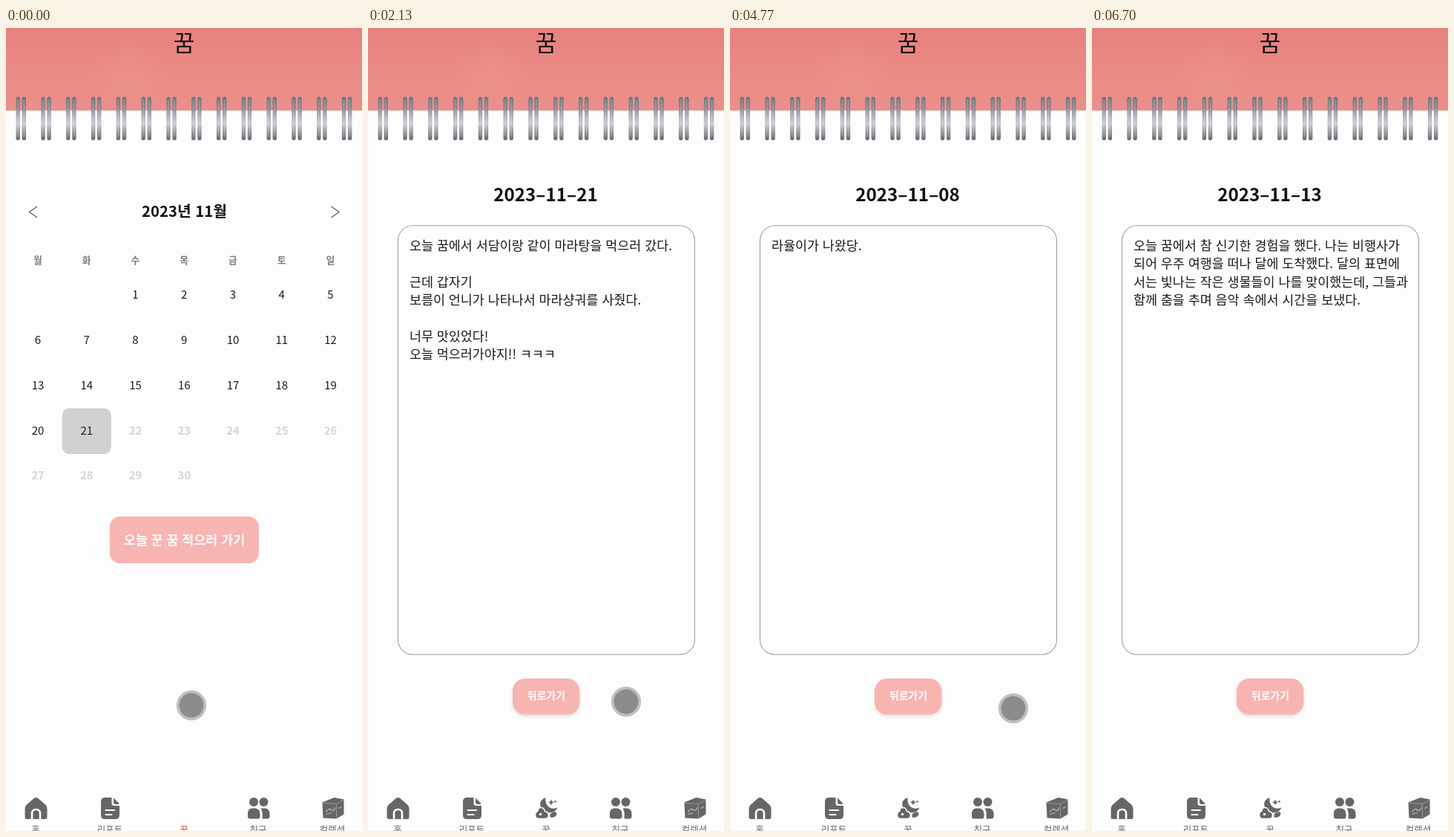
Recreate the animation shown at these times as an HTML page. Size 480x1080 px, loop 7460 ms.

```html
<!DOCTYPE html>
<html lang="ko">
<head>
<meta charset="utf-8">
<style>
html, body { margin: 0; width: 100%; height: 100%; overflow: hidden; background: #fdfdfd; }
svg { display: block; width: 480px; height: 1080px; }
text { font-family: 'Noto Sans CJK KR', 'Noto Sans CJK JP', 'Noto Sans CJK', sans-serif; }
.mid { text-anchor: middle; }
</style>
</head>
<body>
<svg id="stage" viewBox="0 0 480 1080" xmlns="http://www.w3.org/2000/svg">
  <defs>
    <linearGradient id="head" x1="0" y1="0" x2="0" y2="1">
      <stop offset="0" stop-color="#e8827e"/><stop offset="1" stop-color="#eb908b"/>
    </linearGradient>
    <radialGradient id="glow">
      <stop offset="0" stop-color="#f2a49e" stop-opacity=".25"/><stop offset="1" stop-color="#f2a49e" stop-opacity="0"/>
    </radialGradient>
    <linearGradient id="wire" x1="0" y1="0" x2="0" y2="1">
      <stop offset="0" stop-color="#77727a"/><stop offset=".28" stop-color="#8b8890"/>
      <stop offset=".42" stop-color="#a9abb6"/><stop offset=".62" stop-color="#c6c9d3"/>
      <stop offset=".8" stop-color="#96979e"/><stop offset="1" stop-color="#66666a"/>
    </linearGradient>
    <filter id="soft" x="-20%" y="-20%" width="140%" height="150%">
      <feDropShadow dx="0" dy="2" stdDeviation="2" flood-color="#000" flood-opacity=".14"/>
    </filter>
    <filter id="blur"><feGaussianBlur stdDeviation=".7"/></filter>

    <g id="pig">
      <circle cx="-11.5" cy="-10.500" r="4.600" fill="#fbe0c6"/><circle cx="11.5" cy="-10.500" r="4.600" fill="#fbe0c6"/>
      <path d="M-13-8Q-12-13 0-13T13-8L15 3Q14 14.500 0 14.500T-15 3Z" fill="#fdead4"/>
      <rect x="-11" y="-5" width="22" height="11" rx="5.500" fill="#fbcdc5"/>
      <rect x="-7.500" y="-3.500" width="15" height="7.500" rx="3.700" fill="#f5b3b0"/>
      <path d="M-3.500-1v2M3.500-1v2" stroke="#dc8a8a" stroke-width="1.600" stroke-linecap="round"/>
      <circle cx="-9" cy="-5" r=".9" fill="#c99a8c"/><circle cx="9" cy="-5" r=".9" fill="#c99a8c"/>
    </g>
    <g id="meal" stroke-linecap="round" fill="none">
      <path d="M5-5L-12.500 13.500" stroke="#fbdc97" stroke-width="3.600"/>
      <path d="M9-14.500L4-9Q2-5 5-3T11-4L15.500-9M12.500-12L7-6" stroke="#fbdb90" stroke-width="3"/>
      <path d="M-6-6L12.500 13.500" stroke="#eb918a" stroke-width="3.400"/>
      <ellipse cx="-9.500" cy="-9.500" rx="5" ry="6.800" transform="rotate(-45 -9.500 -9.500)" fill="#ee938c"/>
    </g>
    <g id="coin">
      <circle r="16.500" fill="#fdc52f"/><circle r="13" fill="#f9ae0b"/>
      <text class="mid" y="8" font-size="22" font-weight="500" fill="#fff0b4">$</text>
    </g>
    <g id="imp">
      <path d="M-9-8Q-15-11-12-16Q-10-12-4-11ZM9-8Q15-11 12-16Q10-12 4-11Z" fill="#66545a"/>
      <path d="M-10-10Q0-15 10-10Q17-8 16-1Q15 5 10 5Q9 8 5 7Q0 10-5 7Q-9 8-10 4Q-16 4-16-2Q-16-8-10-10Z" fill="#f0a0a2"/>
      <circle cx="-5" cy="-5" r="2.600" fill="#fbe9e9"/><circle cx="5" cy="-5" r="2.600" fill="#fbe9e9"/>
      <circle cx="-4.500" cy="-5" r="1.200" fill="#6b4449"/><circle cx="4.500" cy="-5" r="1.200" fill="#6b4449"/>
      <path d="M-4 2Q0-1 4 2" stroke="#d07880" stroke-width="1.500" fill="none"/>
      <circle cx="-5" cy="11" r="3" fill="#f3abab"/><circle cx="7" cy="12" r="3.500" fill="#ee9c9f"/><circle cx="1" cy="9" r="2" fill="#f3abab"/>
    </g>
    <g id="pals">
      <path d="M-1 14V4Q0 0 7 0Q15 0 15 7V13Q8 15-1 14Z" fill="#cf9bc4"/>
      <circle cx="7" cy="-4" r="8.500" fill="#eccb78"/><ellipse cx="6" cy="0" rx="6" ry="6" fill="#c4956f"/>
      <path d="M-16 14V8Q-15 2-8 2T1 8V14Z" fill="#8461b8"/>
      <circle cx="-8" cy="-5" r="9" fill="#60656d"/><ellipse cx="-7" cy="0" rx="6" ry="6" fill="#e8ba98"/>
      <path d="M-9 0h1M-5 0h1M4 0h1M8 0h1" stroke="#544" stroke-width="1.400"/>
    </g>
    <g id="pile">
      <path d="M-1-13Q5-12 4-8Q10-7 9-1Q16 1 16 7Q16 12 10 12H-10Q-16 12-16 7Q-16 1-10 0Q-10-6-4-7Q0-9-1-13Z" fill="#c08573"/>
      <path d="M-10 1Q0 3 9-1M-5-7Q0-5 4-8" stroke="#ab6e5c" fill="none"/>
      <path d="M-5 3v2M5 3v2" stroke="#5b3a32" stroke-width="1.600" stroke-linecap="round"/>
      <path d="M-3 6Q0 10 3 6" stroke="#f6e3dc" stroke-width="1.300" fill="none"/>
    </g>

    <g id="home">
      <path d="M0-14.500Q2-14.500 4-12.500L13-4.500Q15-2.500 15 .5V12Q15 14.500 12 14.500H-12Q-15 14.500-15 12V.5Q-15-2.500-13-4.500L-4-12.500Q-2-14.500 0-14.500Z" fill="#666"/>
      <path d="M-5.500 15V7Q-5.500 1.500 0 1.500T5.500 7V15" stroke="#fdfdfd" stroke-width="2.600" fill="none"/>
    </g>
    <g id="report">
      <path d="M-7-14.500H2V-7Q2-3.500 5.500-3.500H12.500V9Q12.500 14.500 7 14.500H-7Q-12.500 14.500-12.500 9V-9Q-12.500-14.500-7-14.500ZM4.500-14L12-6.500Q12-5.500 11-5.500H7Q4.500-5.500 4.500-8Z" fill="#666"/>
      <path d="M-6 2.500H5.500M-6 8.500H2" stroke="#fdfdfd" stroke-width="2.200" stroke-linecap="round"/>
    </g>
    <g id="dream">
      <path d="M-1-14.500Q-10-11-8-3Q-5 6 4 6Q12 6 15-1Q8 2 3-2T-1-14.500Z"/>
      <path d="M6.500-12l1.200 2.800 2.800 1.200-2.800 1.200-1.200 2.800-1.200-2.800-2.800-1.200 2.800-1.200Z"/>
      <circle cx="12" cy="-9" r="1.300"/>
      <path d="M-7.500-1Q-3-1-2 4Q3 5 3 9.500Q3 14-2 14H-10Q-15 14-15 9Q-15 5-12 4Q-11-1-7.500-1Z" stroke="#fdfdfd" stroke-width="1.500"/>
      <path d="M5 8Q9 4 13 5Q15 8 12 11Q9 13 5 12Z"/>
      <circle cx="-8" cy="8" r="1.800" fill="#fdfdfd"/>
    </g>
    <g id="friends" fill="#666">
      <circle cx="-6.500" cy="-8.500" r="6"/><circle cx="7" cy="-8.500" r="6"/>
      <path d="M-9 0H-4Q2 1 2 8V11Q2 14-1 14H-11.500Q-14.500 14-14.500 11V7Q-14.500 1-9 0ZM3 0H9Q15 1 15 7V11Q15 14 12 14H5Q6 4 3 0Z"/>
    </g>
    <g id="box">
      <path d="M-14-8L2-14.500L15-12V8L5 14L-13 13Z" fill="#666"/>
      <path d="M-14-7L5-6L15-11.500M5-6V13" stroke="#999" fill="none"/>
      <path d="M-9 5Q-6-1-2 2T3-1M-9 8L-2 6M8 0L12-2" stroke="#bbb" stroke-width="1.300" fill="none"/>
    </g>
  </defs>
  <rect width="480" height="1080" fill="#fdfdfd"/>
  <g id="top"></g>
  <g id="cal"></g>
  <g id="note"></g>
  <g id="nav"></g>
  <g id="dot" filter="url(#blur)">
    <circle r="20.200" fill-opacity=".24"/>
    <circle r="16.500" fill="#17191d" fill-opacity=".31"/>
  </g>
</svg>
<script>
const LOOP = 7460;
const $ = id => document.getElementById(id);
const label = (s, x, y, size, fill, weight = 400, cls = 'mid', id = '') =>
  `<text ${id && `id="${id}"`} class="${cls}" x="${x}" y="${y}" font-size="${size}" fill="${fill}" font-weight="${weight}">${s}</text>`;
const icon = (name, x, y, extra = '') => `<use href="#${name}" transform="translate(${x} ${y})" ${extra}/>`;
const show = (id, on) => $(id).setAttribute('visibility', on ? 'inherit' : 'hidden');
const fade = (id, v) => $(id).setAttribute('opacity', v);
const colX = i => 43 + 65.75 * i;
const rowY = i => 359 + 60.7 * i;
const cellOf = day => [colX((day + 1) % 7), rowY(Math.floor((day + 1) / 7))];

const STAMPS = { 2: 'pig', 3: 'meal', 5: 'coin', 7: 'imp', 8: 'pals', 10: 'pig', 11: 'meal', 13: 'pile', 16: 'pig', 21: 'meal' };
const NOTES = {
  21: ['오늘 꿈에서 서담이랑 같이 마라탕을 먹으러 갔다.', '', '근데 갑자기', '보름이 언니가 나타나서 마라샹궈를 사줬다.', '', '너무 맛있었다!', '오늘 먹으러가야지!! ㅋㅋㅋ'],
  8: ['라율이가 나왔당.'],
  13: ['오늘 꿈에서 참 신기한 경험을 했다. 나는 비행사가', '되어 우주 여행을 떠나 달에 도착했다. 달의 표면에', '서는 빛나는 작은 생물들이 나를 맞이했는데, 그들과', '함께 춤을 추며 음악 속에서 시간을 보냈다.']
};
const dateOf = day => '2023–11–' + String(day).padStart(2, '0');

// Each visit: calendar opens, data arrives, a day is picked, its note opens.
const VISITS = [
  { open: 0, load: 230, pick: 720, note: 1500, day: 21 },
  { open: 2420, load: 2560, pick: 3720, note: 4200, day: 8 },
  { open: 5000, load: 5130, pick: 5540, note: 6260, day: 13 }
];
const BACK_PRESS = [2290, 4900];

// Pointer runs: [time, x, y]; it is hidden between runs.
const RUNS = [
  [[0, 250, 911], [100, 236, 860], [500, 112, 545], [1100, 108, 541]],
  [[1310, 118, 552], [1420, 240, 690], [1500, 244, 694], [1530, 262, 880], [1570, 366, 996], [1600, 350, 915], [1630, 348, 906]],
  [[2130, 348, 906], [2280, 244, 900], [2430, 242, 898], [2720, 458, 610], [2900, 400, 488], [3130, 284, 417], [3380, 104, 430],
   [3640, 176, 421], [3740, 174, 420], [4000, 242, 690], [4180, 244, 690], [4360, 458, 900], [4430, 447, 925]],
  [[4700, 447, 925], [4770, 382, 915], [4890, 246, 900], [5000, 242, 898], [5330, 118, 560], [5490, 46, 482], [5600, 44, 481],
   [5980, 238, 690], [6240, 260, 684], [6620, 260, 684], [6660, 350, 770], [6700, 350, 770]]
];

function buildTop() {
  let s = '<rect width="480" height="111" fill="url(#head)"/>' +
    '<ellipse cx="165" cy="62" rx="60" ry="48" fill="url(#glow)"/>';
  for (let i = 0; i < 14; i++) {
    const x = 20.3 + 33.8 * i;
    for (const dx of [-6.8, 1.3])
      s += `<rect x="${x + dx}" y="92.500" width="5.400" height="58.500" rx="2.700" fill="url(#wire)"/>` +
        `<rect x="${x + dx + 1.8}" y="96" width="1.600" height="50" fill="#fff" opacity=".18"/>`;
  }
  $('top').innerHTML = s + label('꿈', 240, 31, 31, '#111', 500);
}

function buildCal() {
  let s = label('2023년 11월', 240.5, 254, 20.3, '#111', 700) +
    '<path d="M42 240L31.500 247.500L42 255M438.500 240L449 247.500L438.500 255" fill="none" stroke="#555" stroke-width="1.200"/>';
  [...'월화수목금토일'].forEach((d, i) => s += label(d, colX(i), 316.5, 12.8, '#7c7c7c', 700));
  s += '<rect x="75.700" y="511.500" width="66" height="61.500" rx="9" fill="#d1d1d1"/>' +
    '<rect id="pick" width="66" height="61.500" rx="9" fill="#fdc4c8"/>';
  for (let d = 1; d <= 30; d++) {
    const [x, y] = cellOf(d), future = d > 21;
    s += label(d, x, y + 5.4, 15, future ? '#d6d6d6' : '#1c1c1c', future ? 700 : 400, 'mid', 'd' + d);
    if (STAMPS[d]) s += icon(STAMPS[d], x, y - 0.7, `id="s${d}"`);
  }
  s += '<g id="go"><rect id="goBox" y="657" height="63" rx="14" fill="#f7b4b1"/>' +
    label('', 240.5, 694.5, 17.4, '#fff', 700, 'mid', 'goText') + '</g>';
  $('cal').innerHTML = s;
}

function buildNote() {
  let s = label('', 239.5, 232.5, 24.2, '#111', 700, 'mid', 'date') +
    '<rect x="40.500" y="265.700" width="400" height="577" rx="20" fill="none" stroke="#a0a0a0" stroke-width="1.100"/>';
  for (const day in NOTES)
    s += `<g id="n${day}">` + NOTES[day].map((l, i) => label(l, 56, 299 + 24.3 * i, 17.4, '#1a1a1a', 400, '')).join('') + '</g>';
  s += '<g id="back"><rect x="195" y="875" width="90.500" height="48.500" rx="17" fill="#f7b4b1" filter="url(#soft)"/>' +
    label('뒤로가기', 240.5, 903, 13.9, '#fff', 700) + '</g>';
  $('note').innerHTML = s;
}

function buildNav() {
  const tabs = [['home', '홈'], ['report', '리포트'], ['dream', '꿈'], ['friends', '친구'], ['box', '컬렉션']];
  $('nav').innerHTML = tabs.map(([name, t], i) => {
    const x = 40.5 + 100 * i;
    return icon(name, x, 1049.5, `id="tab${i}"`) + label(t, x - 0.5, 1082.5, 12.5, '#666', 500, 'mid', 'tl' + i);
  }).join('');
}

function pointer(t) {
  const run = RUNS.find(r => t >= r[0][0] && t < r[r.length - 1][0]);
  show('dot', run);
  if (!run) return;
  const i = run.findIndex(k => k[0] > t);
  const [t0, x0, y0] = run[i - 1], [t1, x1, y1] = run[i];
  const u = (t - t0) / (t1 - t0), e = u * u * (3 - 2 * u);
  $('dot').setAttribute('transform', `translate(${x0 + (x1 - x0) * e} ${y0 + (y1 - y0) * e})`);
}

function draw(t) {
  const v = VISITS.filter(v => t >= v.open).pop();
  const onNote = t >= v.note, loaded = t >= v.load, picked = t >= v.pick;
  show('cal', !onNote);
  show('note', onNote);

  if (onNote) {
    $('date').textContent = dateOf(v.day);
    for (const day in NOTES) show('n' + day, +day === v.day);
    fade('back', BACK_PRESS.some(p => t >= p && t < p + 130) ? 0.5 : 1);
  } else {
    const [px, py] = cellOf(v.day);
    show('pick', picked);
    $('pick').setAttribute('x', px - 33);
    $('pick').setAttribute('y', py - 29.6);
    for (const d in STAMPS) {
      show('s' + d, loaded);
      show('d' + d, !loaded);
    }
    fade('s21', t >= 1180 && t < 1330 ? 0.65 : 1);
    const w = loaded ? 182 : 201;
    $('goBox').setAttribute('x', 240.4 - w / 2);
    $('goBox').setAttribute('width', w);
    $('goText').setAttribute('font-size', loaded ? 16.4 : 17.4);
    $('goText').textContent = loaded ? dateOf(picked ? v.day : 21) + '일의 꿈' : '오늘 꾼 꿈 적으러 가기';
    fade('go', t > v.note - 60 ? 0.6 : 1);
  }

  const tint = onNote ? '#666' : '#cc504d';
  $('tab2').setAttribute('fill', tint);
  $('tl2').setAttribute('fill', tint);
  show('tab2', onNote || loaded);
  pointer(t);
}

buildTop();
buildCal();
buildNote();
buildNav();
function tick() {
  draw(performance.now() % LOOP);
  requestAnimationFrame(tick);
}
draw(0);
requestAnimationFrame(tick);
</script>
</body>
</html>
```
